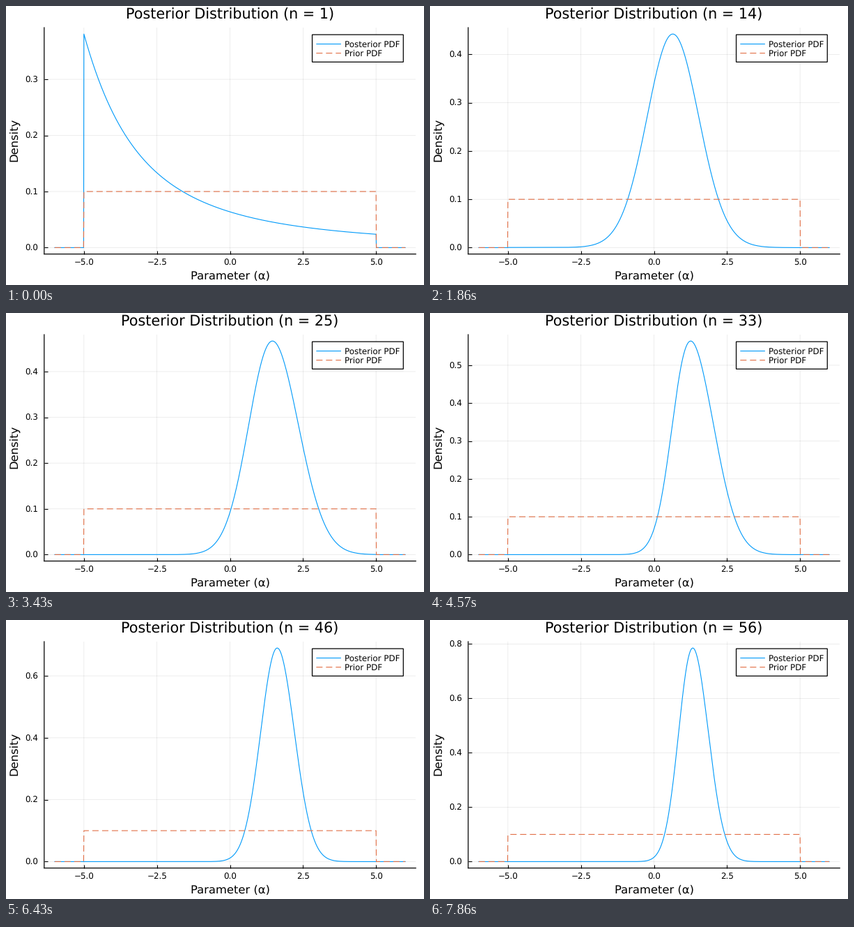
A matplotlib script that plays this animation: 600x400 px, repeating every 8000 ms.

```python
import numpy as np
import matplotlib.pyplot as plt
from matplotlib.animation import FuncAnimation
from matplotlib.patches import Rectangle

plt.rcParams["font.family"] = "DejaVu Sans"
plt.rcParams["text.hinting"] = "none"
plt.rcParams["path.snap"] = False

W, H, DPI = 600, 400, 100
SAMPLES, LOOP_MS, TICK_MS = 56, 8000, 40
FRAMES = LOOP_MS // TICK_MS
PT = 72 / DPI                      # points per pixel
TOP, BOTTOM, RIGHT = 31.0, 355.6, 588.2
BLUE, ORANGE = "#009AFA", "#E26F46"
DASH = (0, (8.1, 4.5))
LEGEND = ((54.5, "Posterior PDF", BLUE, "-"),
          (67.6, "Prior PDF", ORANGE, DASH))
KEY_END, BOX_END = 480.9, 570.3

alpha = np.round(np.linspace(-6, 6, 1201), 2)
inside = np.abs(alpha) <= 5
prior = 0.1 * inside

# sample count, mode, peak height and skew of the main bump
KEYS = np.array([
    (8, -0.60, 0.2685, -0.090),
    (9, -0.45, 0.2800, -0.080),
    (14, 0.644, 0.4423, 0.007),
    (25, 1.454, 0.4667, 0.058),
    (33, 1.257, 0.5640, 0.142),
    (46, 1.617, 0.6900, 0.025),
    (56, 1.328, 0.7854, 0.064),
])


def normalise(p):
    p = p * inside
    return p / (p.sum() * (alpha[1] - alpha[0]))


def bump(z, skew, n):
    # skewed bell whose heavy tails fade as samples accumulate
    k = n ** 2 / 8
    u = z / (1 + skew * np.tanh(z))
    return np.exp(-k * np.log1p(u ** 2 / (2 * k)))


def late_density(n):
    mode, peak, skew = (np.interp(n, KEYS[:, 0], KEYS[:, i]) for i in (1, 2, 3))
    mass = 0.21 * 0.4 ** (n - 8)
    z = np.linspace(-12, 12, 2401)
    sigma = (1 - mass) / (peak * bump(z, skew, n).sum() * (z[1] - z[0]))
    shoulder = normalise(np.exp(-((alpha + 4.55) / 1.7) ** 2 / 2))
    return normalise(peak * bump((alpha - mode) / sigma, skew, n) + mass * shoulder)


def density(n):
    if n >= 8:
        return late_density(n)
    # each sample adds to the log density
    t = (n - 1) / 7
    first = normalise(1 / (4 + (alpha + 7.434) ** 2))
    last = late_density(8)
    return normalise(np.where(inside, first, 1) ** (1 - t)
                     * np.where(inside, last, 1) ** t)


def tick_step(limit):
    return max(s for s in (0.02, 0.05, 0.1, 0.2) if limit / s >= 3 or s == 0.02)


fig = plt.figure(figsize=(W / DPI, H / DPI), dpi=DPI, facecolor="white")
ax = fig.add_axes([0.1, 0.1, 0.8, 0.8])
ax.set_xlim(-6.36, 6.36)
xticks = np.arange(-5, 5.1, 2.5)
ax.set_xticks(xticks, [f"{v:.1f}".replace("-", "\u2212") for v in xticks])
ax.tick_params(direction="in", length=5 * PT, width=0.8, labelsize=11.85 * PT)
ax.tick_params(axis="x", pad=7 * PT)
ax.tick_params(axis="y", pad=8.7 * PT)
ax.grid(color="black", alpha=0.1, linewidth=0.5)
ax.set_axisbelow(True)
for side in ("top", "right"):
    ax.spines[side].set_visible(False)
for side in ("left", "bottom"):
    ax.spines[side].set_linewidth(0.9)
curve, = ax.plot([], [], color=BLUE, lw=0.8)
ax.plot(alpha, prior, color=ORANGE, lw=0.8, ls=DASH, dash_capstyle="butt")

# overlay in pixel units for labels and legend
page = fig.add_axes([0, 0, 1, 1])
page.set_xlim(0, W)
page.set_ylim(H, 0)
page.axis("off")


def label(x, y, s, px, **kw):
    return page.text(x, y, s, fontsize=px * PT, va="baseline", **kw)


title = label(0, 18.6, "", 20.75, ha="center")
xlabel = label(0, 392.3, "Parameter (α)", 16.35, ha="center")
label(16.3, (TOP + BOTTOM) / 2 - 1, "Density", 16.35, ha="center",
      rotation=90, rotation_mode="anchor")

box = page.add_patch(Rectangle((0, 41.1), 0, 39.2, fc="white",
                               ec="black", lw=0.9))
keys = []
for y, name, color, style in LEGEND:
    keys += page.plot([], [], color=color, lw=0.8, ls=style,
                      solid_capstyle="butt", dash_capstyle="butt")
    label(485.8, y + 4.4, name, 11.85, ha="left")


def place(left):
    ax.set_position([left / W, 1 - BOTTOM / H,
                     (RIGHT - left) / W, (BOTTOM - TOP) / H])
    middle = (left + RIGHT) / 2
    title.set_x(middle)
    xlabel.set_x(middle)
    start = KEY_END - (RIGHT - left) / 15
    for key, row in zip(keys, LEGEND):
        key.set_data([start, KEY_END], [row[0], row[0]])
    box.set_x(start - 5.8)
    box.set_width(BOX_END - start + 5.8)


def draw(i):
    n = min(SAMPLES, (i + 1) * SAMPLES // FRAMES + 1)
    p = density(n)
    peak = p.max()
    curve.set_data(alpha, p)
    step = tick_step(1.03 * peak)
    digits = 1 if step >= 0.1 else 2
    ticks = np.arange(int(1.03 * peak / step) + 1) * step
    ax.set_yticks(ticks, [f"{v:.{digits}f}" for v in ticks])
    ax.set_ylim(-0.03 * peak, 1.03 * peak)
    place(54.8 if digits == 1 else 62.2)
    title.set_text(f"Posterior Distribution (n = {n})")
    return curve, title


anim = FuncAnimation(fig, draw, frames=FRAMES, interval=TICK_MS,
                     init_func=lambda: draw(0), repeat=True, repeat_delay=0)
plt.show()
```
